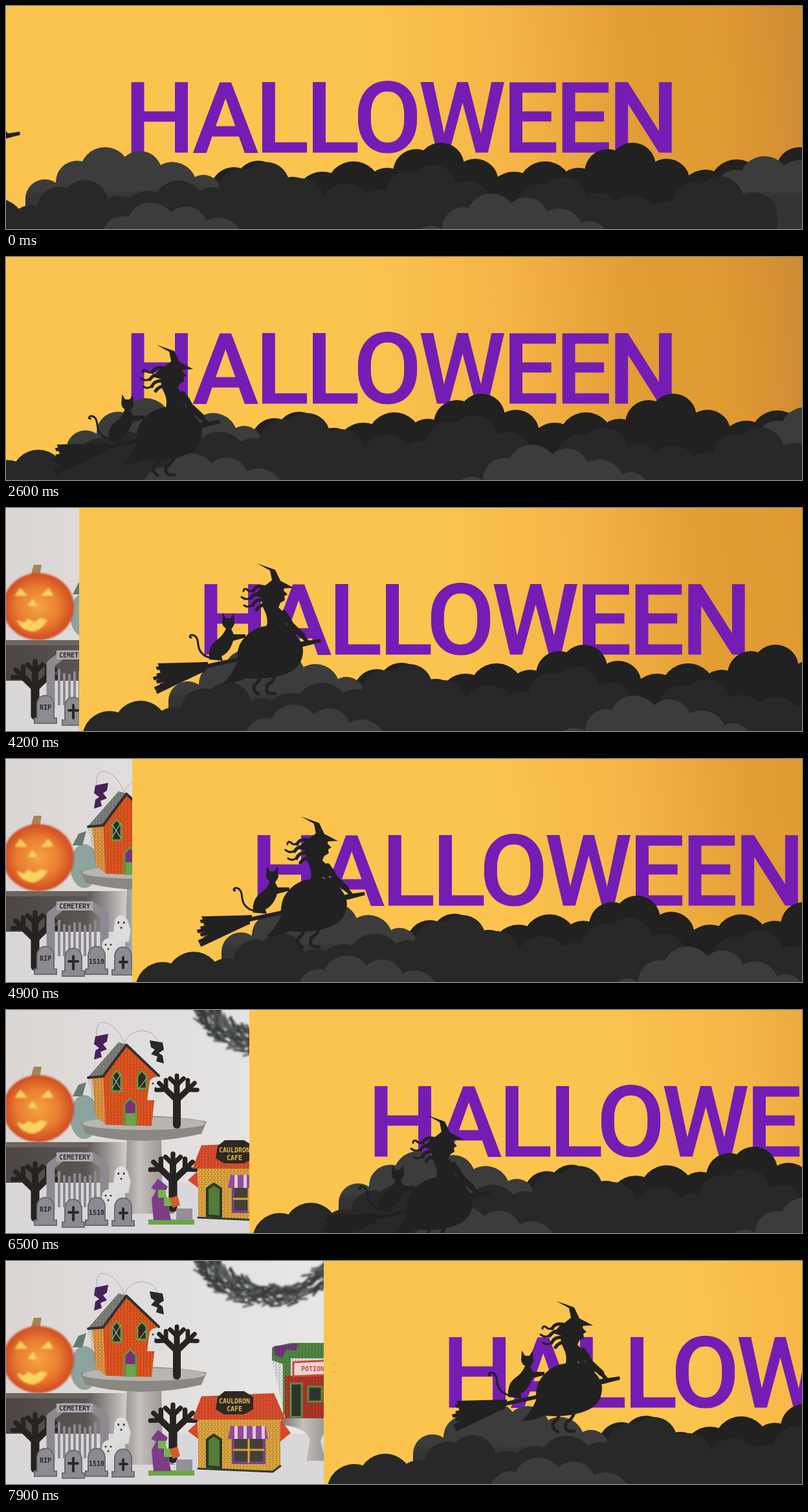
Write an HTML page that moves like this. It is 1230x346 px and loops after 8000 ms.

```html
<!DOCTYPE html>
<html lang="en">
<head>
<meta charset="utf-8">
<title>Halloween banner</title>
<style>
  html, body { margin: 0; width: 100%; height: 100%; overflow: hidden; }
  svg { display: block; width: 100vw; height: 100vh; }
  .title { font: 500 153px Roboto, sans-serif; letter-spacing: -4.8px; fill: #731db4; stroke: #731db4; }
  .sign { font: 700 10px "DejaVu Sans Mono", monospace; text-anchor: middle; }
  .line { fill: none; stroke-linecap: round; stroke-linejoin: round; }
</style>
</head>
<body>
<svg viewBox="0 0 1230 346" preserveAspectRatio="none">
  <defs>
    <linearGradient id="sky" gradientUnits="userSpaceOnUse" x1="0" y1="0" x2="1220" y2="-106">
      <stop offset=".46" stop-color="#fbc44f"/>
      <stop offset=".5" stop-color="#f9be4b"/>
      <stop offset=".62" stop-color="#f6b547"/>
      <stop offset=".78" stop-color="#e29d34"/>
      <stop offset=".89" stop-color="#e09a32"/>
      <stop offset="1" stop-color="#cf8b34"/>
    </linearGradient>
    <linearGradient id="mist" gradientUnits="userSpaceOnUse" x1="0" y1="284" x2="0" y2="296">
      <stop stop-color="#3c3c3c"/>
      <stop offset="1" stop-color="#343434"/>
    </linearGradient>
    <linearGradient id="wall">
      <stop stop-color="#d9d6d4"/>
      <stop offset=".5" stop-color="#e2dfdf"/>
      <stop offset="1" stop-color="#e8e6e7"/>
    </linearGradient>
    <linearGradient id="shelf">
      <stop stop-color="#4b4644"/>
      <stop offset=".65" stop-color="#5a5553"/>
      <stop offset="1" stop-color="#d8d5d4"/>
    </linearGradient>
    <linearGradient id="metal">
      <stop stop-color="#77736f"/>
      <stop offset=".4" stop-color="#c3c0bd"/>
      <stop offset="1" stop-color="#85817e"/>
    </linearGradient>
    <radialGradient id="pumpkin">
      <stop stop-color="#f6a443"/>
      <stop offset=".6" stop-color="#e97c30"/>
      <stop offset="1" stop-color="#cf4a22"/>
    </radialGradient>
    <filter id="soft"><feGaussianBlur stdDeviation="1.6"/></filter>
    <pattern id="stitch" width="5" height="6" patternUnits="userSpaceOnUse">
      <path d="M0 0H5M1 5L4 2" stroke="#000" stroke-opacity=".28" stroke-width="1.4"/>
    </pattern>
    <g id="tree" class="line" stroke="#262321"></g>
    <g id="ghost">
      <path fill="#dedcdb" d="M-13 18L-9 -12Q0 -24 9 -12L14 2L11 18Z"/>
      <path class="line" stroke="#333" stroke-width="3" d="M-4 -8h0M4 -8h0M0 -1h0"/>
    </g>
    <path id="grave" fill="#8d8b91" stroke="#6d6b72" stroke-width="2" d="M-13 26V4Q-11 -9 0 -9T13 4V26H17V34H-17V26Z"/>
    <path id="bat" d="M-10 -16L10 -20L8 -8L2 -4L8 4L-2 8L0 16L-12 20L-10 6L-4 2L-12 -4Z"/>
  </defs>

  <g id="photo">
    <rect width="510" height="346" fill="url(#wall)"/>
    <rect y="205" width="190" height="64" fill="url(#shelf)"/>
    <rect y="205" width="128" height="8" fill="#6b6562"/>
    <rect y="268" width="510" height="78" fill="#d9d7d9"/>
    <g id="wreath" class="line" stroke-width="3" filter="url(#soft)"></g>

    <ellipse cx="121" cy="166" rx="22" ry="34" fill="#8da39d"/>
    <path fill="#667a70" d="M103 134L112 116L124 112L118 134Z"/>
    <path fill="#a48556" d="M38 105L43 88H55L52 105Z"/>
    <g filter="url(#soft)">
      <ellipse cx="50" cy="153" rx="55" ry="52" fill="url(#pumpkin)"/>
      <path fill="#fbd45f" d="M14 136L22 124L33 136ZM54 136L66 124L73 136ZM34 152L41 141L48 152ZM17 174L28 178L34 172L44 177L54 171L64 174Q52 193 38 191Q22 188 17 174Z"/>
    </g>

    <path fill="url(#metal)" d="M187 200H240L242 294Q246 308 262 316H168Q182 308 184 294Z"/>
    <path fill="#8b8783" d="M115 174Q210 155 310 173L302 192Q210 214 123 192Z"/>
    <ellipse cx="213" cy="176" rx="95" ry="10" fill="#b9b5b1"/>

    <path class="line" stroke="#aaa" d="M183 52Q170 20 148 19Q138 22 140 45M183 52Q190 32 212 32Q232 34 237 55"/>
    <use href="#bat" x="148" y="57" fill="#492058"/>
    <use href="#bat" transform="translate(232 65) scale(-1 .9)" fill="#292729"/>
    <path fill="#e99a45" d="M133 106L153 100L156 178L139 166Z"/>
    <path fill="#e95721" d="M150 100L185 54L233 102L225 180L154 178Z"/>
    <path fill="#85857f" d="M126 105L174 50L187 54L150 104Z"/>
    <path fill="url(#stitch)" d="M126 105L174 50L187 54L233 102L225 180L154 178L139 166Z"/>
    <path class="line" stroke="#30302e" stroke-width="4" d="M127 105L150 103L186 54L236 102"/>
    <g fill="#292b27" stroke="#67953f" stroke-width="3">
      <path d="M164 126V102L171 94L178 102V126ZM203 122V102L210 94L217 102V122Z"/>
      <path fill="#793078" d="M183 178V146L192 137L201 146V178Z"/>
    </g>
    <path fill="#68a54b" d="M185 160H200V179H185Z"/>
    <path class="line" stroke="#ddd" d="M165 103L177 122M177 100L165 120M205 122L216 108"/>
    <use href="#ghost" x="231" y="122"/>
    <use href="#tree" x="264" y="98"/>

    <use href="#tree" transform="translate(45 234) scale(1.1)"/>
    <path class="line" stroke="#8c8990" stroke-width="13" d="M69 310V242L88 227H132L152 242V304"/>
    <g id="gate" stroke="#8c8990" stroke-width="4"></g>
    <rect x="78" y="221" width="56" height="14" fill="#aaa7ac"/>
    <text class="sign" x="106" y="232" fill="#2c2b2d">CEMETERY</text>
    <use href="#ghost" transform="translate(178 263) scale(1.05 1.15)"/>
    <use href="#ghost" x="158" y="296"/>
    <use href="#grave" x="61" y="300"/>
    <use href="#grave" x="104" y="303"/>
    <use href="#grave" x="140" y="300"/>
    <use href="#grave" x="181" y="301"/>
    <g class="sign" fill="#28272a">
      <text x="61" y="313">RIP</text>
      <text x="140" y="318">1510</text>
    </g>
    <path class="line" stroke="#29282b" stroke-width="4" d="M104 306V326M97 314H111M181 308V324M176 315H187"/>

    <use href="#tree" transform="translate(258 219) scale(1.1)"/>
    <path fill="#6aa645" d="M220 325H291V333H220Z"/>
    <path fill="#7c3c86" d="M228 326L225 293L232 280L224 276L235 262L250 274L246 282L255 326Z"/>
    <path fill="#70b84d" d="M235 279H247V291H235ZM244 291H261V304H244Z"/>
    <path fill="#d35b28" d="M252 292L265 288L269 303L258 307Z"/>
    <path fill="#939097" d="M263 308H288V326H263Z"/>

    <path fill="url(#metal)" d="M425 244H510V252Q490 262 486 280L494 310H464L470 278Q464 258 425 254Z"/>
    <path fill="#558c45" d="M411 134L440 127H510V151H440V245L428 238V160L411 154Z"/>
    <path fill="#743a7f" d="M414 132L452 128L448 139L434 137L426 150L415 146Z"/>
    <path fill="#b53828" d="M431 178H510V244H431Z"/>
    <path fill="#333831" stroke="#629b4c" stroke-width="3" d="M440 190H457V242H440ZM467 195H488V218H467Z"/>
    <path fill="url(#stitch)" d="M411 134L440 127H510V244H431L411 154Z"/>
    <path fill="#e2d9d5" stroke="#d54632" stroke-width="3" d="M444 157L510 154V176L444 179Z"/>
    <text class="sign" x="477" y="171" fill="#d54632">POTIONS</text>

    <path fill="#d8472b" d="M412 250L426 248L440 267L424 280ZM296 250L281 264L297 276Z"/>
    <path fill="#e6ab42" d="M297 244H424V318L412 327L297 320Z"/>
    <path fill="#e3512f" d="M302 210L414 205L432 246H288Z"/>
    <path fill="url(#stitch)" d="M302 210L414 205L432 246H424V318L412 327L297 320V246H288Z"/>
    <path fill="#557a39" stroke="#263a24" stroke-width="4" d="M311 319V277L321 270L332 277V321Z"/>
    <path fill="#444037" stroke="#72438b" stroke-width="4" d="M351 273H399V313H351Z"/>
    <path class="line" stroke="#dda33c" stroke-width="3" d="M375 275V312M352 293H398"/>
    <path fill="#8e4e99" d="M347 256H401L405 276H343Z"/>
    <path stroke="#e1c7df" stroke-width="20" stroke-dasharray="5 9" d="M353 266H403"/>
    <path class="line" stroke="#2e3c27" stroke-width="3" d="M297 322L412 327L424 318"/>
    <path fill="#2b2921" d="M327 211L338 202H368L382 211V230L368 238H337L324 230Z"/>
    <g class="sign" fill="#e7b548">
      <text x="353" y="221">CAULDRON</text>
      <text x="353" y="233">CAFE</text>
    </g>
  </g>

  <g id="panel">
    <rect width="1240" height="346" fill="url(#sky)"/>
    <text class="title" x="183" y="227">HALLOWEEN</text>
  </g>
  <g id="clouds"></g>

  <g id="witch" fill="#212121" stroke="#212121" stroke-width="0">
    <path d="M110 86L138 96L146 113L167 124L142 125L114 127L133 112L130 97Z"/>
    <path d="M116 124L152 123L151 128L157 134L152 137L153 143L146 147L143 154L149 160Q161 165 163 174Q156 181 143 179L146 186H124Q129 172 120 156Q116 148 118 140L106 136Z"/>
    <g class="line">
      <path stroke-width="5" d="M124 123Q108 119 104 129M122 132Q107 130 100 140M122 143Q108 140 103 151M124 150Q114 150 109 158"/>
      <path stroke-width="3" d="M106 125Q100 133 94 126Q89 124 89 129M103 137Q94 145 86 138M106 147Q98 157 90 151"/>
      <path stroke-width="9" d="M151 163L163 182L180 198"/>
      <path stroke-width="6" d="M178 196L188 208M146 178L168 194"/>
      <path stroke-width="5" d="M115 260Q114 270 106 274Q102 282 112 289M138 260Q134 271 126 274Q122 286 130 288L138 288"/>
      <path stroke-width="3" d="M41 233Q21 230 19 212Q18 196 8 197Q4 200 8 201"/>
    </g>
    <path d="M124 183Q97 187 83 212Q78 225 79 240Q72 258 57 272Q76 272 92 264Q130 267 155 257Q180 248 181 222C181 206 168 191 146 182Z"/>
    <path d="M24 244L80 232L180 207L208 203L209 208L186 214L80 238L26 250Z"/>
    <g id="bristles"></g>
    <path d="M57 163L62 171H69L74 163L75 180Q72 186 70 188L74 196L92 196V201L73 206Q68 224 55 230L57 237L36 235Q34 216 46 206Q58 198 62 187Q56 183 56 177Z"/>
  </g>
</svg>

<script>
const LOOP = 8000, STEP = 100, HIDDEN_CLOUD = 108;
const byId = id => document.getElementById(id);
const panel = byId('panel'), clouds = byId('clouds'), witch = byId('witch');

function addPath(parent, d, attrs = {}) {
  const path = document.createElementNS('http://www.w3.org/2000/svg', 'path');
  for (const [name, value] of Object.entries({ d, ...attrs })) path.setAttribute(name, value);
  parent.append(path);
}

let seed = 7;
const random = () => (seed = seed * 16807 % 2147483647) / 2147483647;

// Cloud shapes: puffs as [offset from peak, drop below peak, radius].
const longCloud = [[-183, 45, 42], [-135, 29, 42], [-83, 39, 36], [-38, 10, 36], [0, 0, 36], [53, 25, 36]];
const roundCloud = [[-93, 50, 30], [-43, 21, 33], [0, 0, 39], [54, 6, 34], [104, 23, 38], [152, 43, 28]];

function addClouds(shape, fill, ...peaks) {
  for (const [x, y] of peaks) {
    const d = shape.map(([dx, drop, r]) =>
      `M${x + dx - r} 420V${y + drop + r}a${r} ${r} 0 0 1 ${2 * r} 0V420Z`);
    addPath(clouds, d.join(''), { fill });
  }
}
addClouds(longCloud, '#212121', [390, 240], [672, 212], [968, 212], [1264, 209]);
addClouds(roundCloud, 'url(#mist)', [153, 219], [1172, 233]);
addClouds(longCloud, '#282828', [122, 270], [402, 242], [660, 246], [862, 265], [1103, 264]);
addClouds(roundCloud, '#3c3c3c', [224, 305], [750, 291]);

function addBranch(x, y, angle, length, width) {
  const endX = x + length * Math.sin(angle), endY = y - length * Math.cos(angle);
  addPath(byId('tree'), `M${x} ${y}L${endX} ${endY}`, { 'stroke-width': width });
  if (length < 15) return;
  for (const turn of [-0.8, 0, 0.8]) addBranch(endX, endY, angle + turn, length * 0.62, width * 0.75);
}
addBranch(0, 80, 0, 38, 12);

for (let i = 0; i < 8; i++) {
  addPath(byId('gate'), `M${82 + i * 8} 306V${250 + 8 * Math.abs(Math.sin(i * 0.9))}`);
}

// Needles scattered along the lower half of a ring.
for (let i = 0; i < 420; i++) {
  const a = Math.PI * random(), size = 0.84 + 0.32 * random();
  const x = 410 + 112 * size * Math.cos(a), y = -40 + 95 * size * Math.sin(a);
  const turn = a + 1 + 1.4 * random();
  addPath(byId('wreath'), `M${x} ${y}l${16 * Math.cos(turn)} ${16 * Math.sin(turn)}`,
    { stroke: random() < 0.7 ? '#383b3a' : '#5b5f5d' });
}

for (let i = 0; i < 9; i++) {
  const x = -52 + 12 * random(), y = 241 + 5.3 * i;
  addPath(byId('bristles'), `M34 239L${x} ${y}l2 5L30 253Z`);
}

const poses = [
  { t: 0, drift: 0, x: -77, y: 78 },
  { t: 1700, drift: 7, x: 110, y: 86 },
  { t: 3400, drift: 131, x: 336, y: 168 },
  { t: 4200, drift: 221, x: 388, y: 86 },
  { t: 5700, drift: 396, x: 543, y: 116 },
  { t: 6500, drift: 484, x: 650, y: 163 },
  { t: 7900, drift: 599, x: 850, y: 62 },
];

// Smooth cubic curve of one property through the poses.
function glide(prop, t) {
  const last = poses.length - 1;
  let i = 0;
  while (i < last - 1 && t > poses[i + 1].t) i++;
  const slope = k => {
    const a = poses[Math.max(k - 1, 0)], b = poses[Math.min(k + 1, last)];
    return (b[prop] - a[prop]) / (b.t - a.t);
  };
  const from = poses[i], to = poses[i + 1], span = to.t - from.t;
  const u = (t - from.t) / span, w = 1 - u;
  return w * w * (1 + 2 * u) * from[prop] + u * u * (3 - 2 * u) * to[prop]
    + span * u * w * (w * slope(i) - u * slope(i + 1));
}

const move = (el, x, y = 0) => el.setAttribute('transform', `translate(${x} ${y})`);

function draw(now) {
  const t = Math.floor(now % LOOP / STEP) * STEP;
  const drift = Math.max(0, Math.round(glide('drift', t)));
  move(clouds, drift);
  move(panel, Math.max(0, drift - HIDDEN_CLOUD));
  move(witch, glide('x', t) - 110, glide('y', t) - 86);
}

function tick() {
  draw(performance.now());
  requestAnimationFrame(tick);
}
tick();
</script>
</body>
</html>
```
